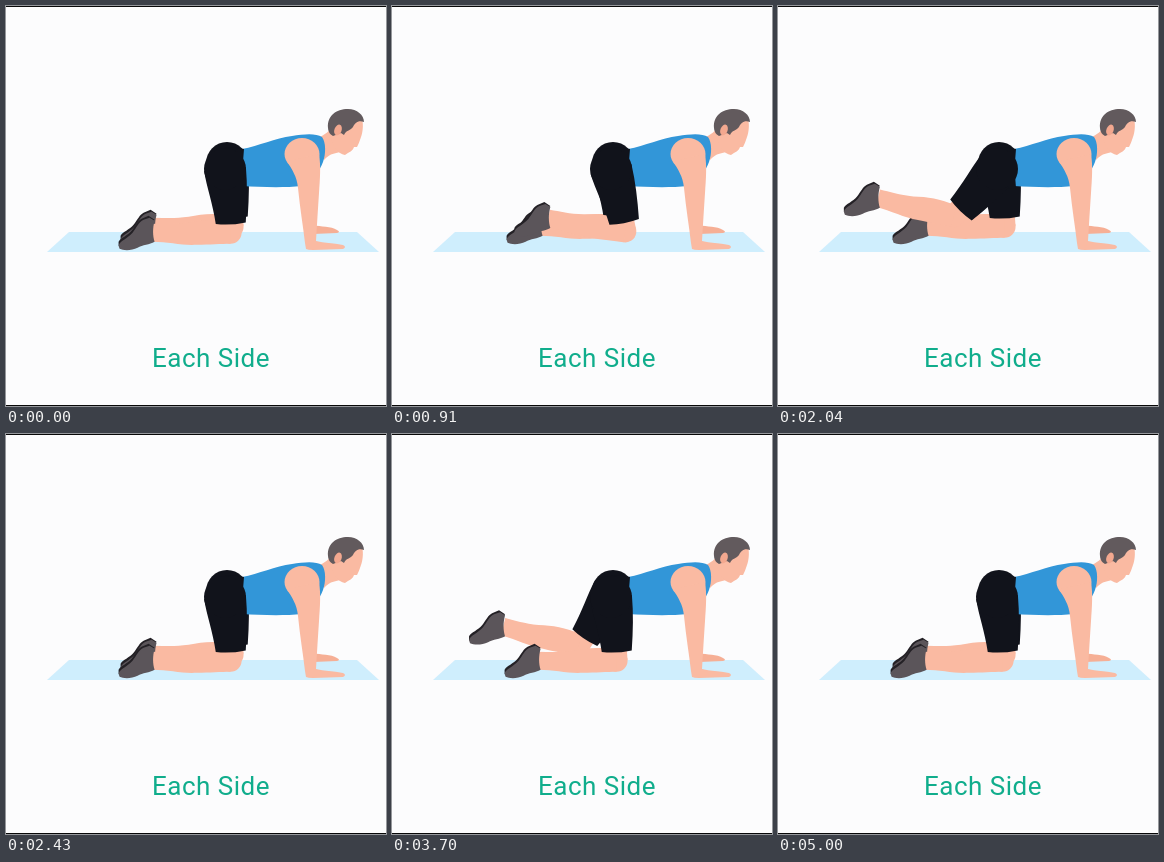
Write an HTML page with a canvas that moves like this. It is 380 by 400 pixels and loops after 5080 ms.

```html
<!DOCTYPE html>
<html lang="en">
<head>
<meta charset="utf-8">
<title>Leg lift exercise</title>
<style>
  html, body { margin: 0; width: 100%; height: 100%; overflow: hidden; background: #fcfcfd; }
  canvas { position: absolute; left: 0; top: 0; }
  p {
    position: absolute; left: 146px; top: 337px; margin: 0;
    font: 400 26px/30px Roboto, sans-serif; letter-spacing: .5px;
    white-space: nowrap; color: #10ad8c;
  }
</style>
</head>
<body>
<canvas id="stage" width="380" height="400"></canvas>
<p>Each Side</p>
<script>
const ctx = document.getElementById('stage').getContext('2d');
const LOOP = 5080;
const SKIN = '#fabaa2', SKIN_FAR = '#f6af95', BLUE = '#3296d8', SHORTS = '#11131b';
const SHOE = '#5b555a', HAIR = '#625a5d', MAT = '#cfeefd';
const THIGH = 64, SHIN = 76;

// Angles in degrees: thigh below the leftward horizontal, shin above it.
const REST = { thigh: 95, shin: 0 };
const TUCK = { thigh: 119, shin: 6 };
const LIFT = { thigh: 6, shin: 5.5 };

const NEAR = { x: 219, y: 163, times: [220, 825, 1430, 1700, 2430] };
const FAR = { x: 221, y: 157, times: [2830, 3395, 3960, 4350, 5000] };
const POSES = [REST, TUCK, LIFT, LIFT, REST];
const BEND = [0, 8, 0, 10.4];

function poseAt(times, t) {
  if (t <= times[0] || t >= times[4]) return REST;
  let i = 0;
  while (t > times[i + 1]) i++;
  const p = (t - times[i]) / (times[i + 1] - times[i]);
  const a = POSES[i], b = POSES[i + 1];
  return {
    thigh: a.thigh + (b.thigh - a.thigh) * p,
    shin: a.shin + (b.shin - a.shin) * p + BEND[i] * Math.sin(Math.PI * p)
  };
}

function fill(color, d) {
  ctx.fillStyle = color;
  ctx.fill(new Path2D(d));
}

function disc(color, x, y, rx, ry = rx, turn = 0) {
  ctx.fillStyle = color;
  ctx.beginPath();
  ctx.ellipse(x, y, rx, ry, turn, 0, 7);
  ctx.fill();
}

function place(x, y, degrees, draw) {
  ctx.save();
  ctx.translate(x, y);
  ctx.rotate(degrees * Math.PI / 180);
  draw();
  ctx.restore();
}

function shoe() {
  fill('#242126', 'M-36 9C-34 5-27 3-23-2C-19-7-17-12-13-14L-6-17L0-13L-4-9L-31 14L-36 13Z');
  fill(SHOE, 'M-36 13C-35 8-27 6-22 0C-18-5-16-11-11-13L-5-15L0-12C-2-5-2 3 0 9C-5 12-12 12-17 15C-23 18-31 18-35 16Z');
}

// Limbs are drawn pointing left and turned into place.
function leg(hip, pose, skin) {
  const a = pose.thigh * Math.PI / 180, b = pose.shin * Math.PI / 180;
  const kx = hip.x - THIGH * Math.cos(a), ky = hip.y + THIGH * Math.sin(a);
  const ax = kx - SHIN * Math.cos(b), ay = ky - SHIN * Math.sin(b);
  place(hip.x, hip.y, -pose.thigh, () => fill(skin, 'M0-12L-64-11L-64 11L0 12Z'));
  place(kx, ky, pose.shin, () => {
    disc(skin, 0, 0, 11);
    fill(skin, 'M0-11C-18-14-30-13-44-10C-58-8-68-9-78-9L-78 9C-62 9-48 13-34 12C-20 12-10 11 0 11Z');
  });
  place(ax, ay, 0, shoe);
  place(hip.x, hip.y, -pose.thigh, () =>
    fill(SHORTS, 'M0-21C-16-20-34-15-54-14Q-57 0-55 16C-36 19-18 21 0 21Z'));
  disc(SHORTS, hip.x, hip.y, 21);
}

function torso() {
  fill(SKIN, 'M306 134C314 131 320 129 325 122L340 145C330 147 324 147 318 154Z');
  fill(BLUE, 'M236 143C253 140 269 132 286 130C298 128 310 127 316 131C320 136 320 148 317 156C314 165 306 174 296 180C276 182 254 181 236 180Z');
}

function arm() {
  disc(SKIN, 296, 148, 17.5, 16);
  fill(SKIN, 'M281 155C286 164 291 170 292 182C294 202 297 220 299 237L300 243Q302 244 307 244L337 243Q341 241 337 239C327 237 318 237 310 235C311 218 312 202 313 187C314 173 315 160 313 148Z');
}

function head() {
  fill(SKIN, 'M325 113L355 110C358 116 357 126 355 131C354 134 353 137 351 141L348 141C347 145 343 146 339 149C332 148 326 140 324 129Z');
  fill(HAIR, 'M322 122C321 110 330 103 342 103C351 103 358 109 358 116C352 114 349 117 347 121C344 125 340 124 338 129L335 127L327 130Q322 127 322 122Z');
  disc('#f3a88f', 332, 124, 3.6, 5.6, .35);
}

function pelvis() {
  fill(SHORTS, 'M219 142C226 141 232 142 238 143Q236 162 238 182L219 184Z');
}

function draw(t) {
  ctx.fillStyle = '#fcfcfd';
  ctx.fillRect(0, 0, 380, 400);
  ctx.fillStyle = '#080808';
  ctx.fillRect(0, 0, 380, 1);
  ctx.fillRect(0, 399, 380, 1);

  fill(MAT, 'M63 226L351 226L373 246L41 246Z');
  fill(SKIN_FAR, 'M307 219C315 221 325 220 331 224Q335 226 331 227L307 228Z');
  leg(FAR, poseAt(FAR.times, t), SKIN);
  torso();
  pelvis();
  leg(NEAR, poseAt(NEAR.times, t), SKIN);
  arm();
  head();
}

function tick() {
  draw(performance.now() % LOOP);
  requestAnimationFrame(tick);
}
tick();
</script>
</body>
</html>
```
